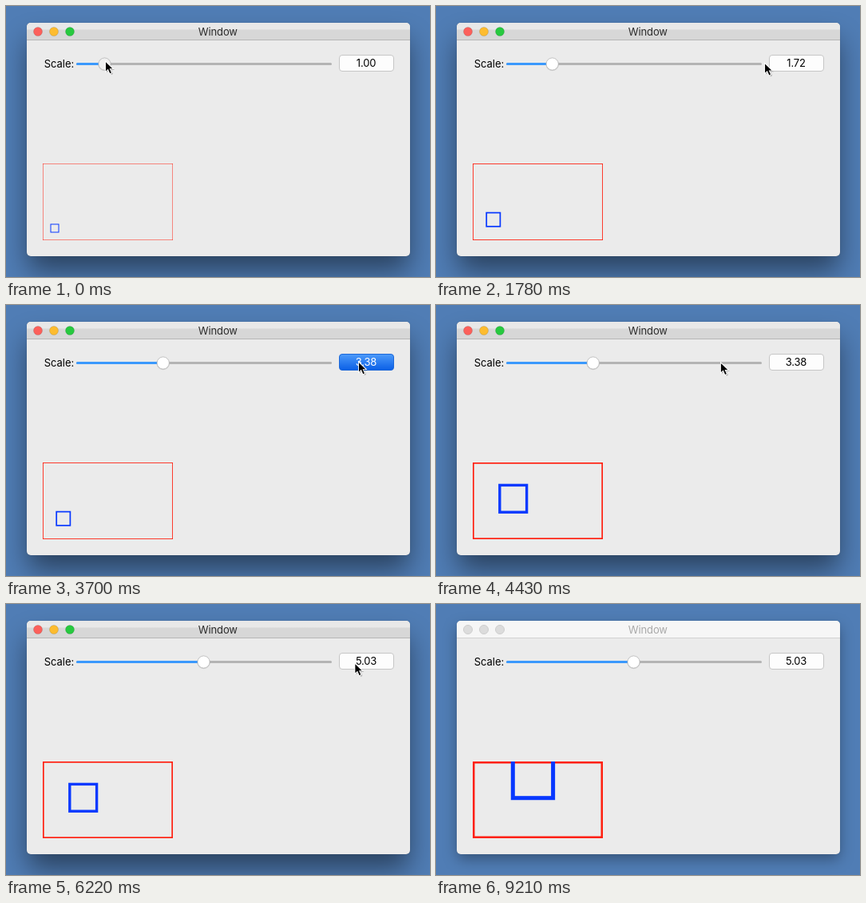
These frames come from a looping animation (531 px wide and 339 px high, 9.31 s). An HTML page:

```html
<!DOCTYPE html>
<html lang="en">
<head>
<meta charset="utf-8">
<title>Window</title>
<style>
html, body { margin: 0; width: 100%; height: 100%; overflow: hidden; background: #507db5; }
#win {
  position: absolute; left: 26px; top: 21px; width: 480px; height: 292px;
  border-radius: 5px; background: #ebebeb;
  box-shadow: 0 20px 34px -2px rgba(0,0,0,.48), 0 0 1px rgba(0,0,0,.35);
}
#win.idle { box-shadow: 0 7px 18px -1px rgba(0,0,0,.34), 0 0 1px rgba(0,0,0,.25); }
#bar {
  box-sizing: border-box; height: 22px; border-radius: 5px 5px 0 0;
  border-bottom: 1px solid #b6b6b6;
  background: linear-gradient(#e8e8e8 8px, #d7d7d7 9px);
}
.idle #bar { background: #f6f6f6; border-color: #d2d2d2; }
svg { position: absolute; left: 0; top: 0; }
text { font: 13px Inter, "Open Sans", sans-serif; text-anchor: middle; }
#title { fill: #2c2c2c; letter-spacing: -.1px; }
.light { stroke: rgba(0,0,0,.12); }
.idle + svg #title { fill: #a9a9a9; }
.idle + svg .light { fill: #dcdcdc; stroke: #cecece; }
</style>
</head>
<body>
<div id="win"><div id="bar"></div></div>
<svg width="531" height="339">
  <defs>
    <linearGradient id="blue" x2="0" y2="1">
      <stop stop-color="#4d9bfa"/><stop offset="1" stop-color="#0a5fe6"/>
    </linearGradient>
    <clipPath id="view"><rect x="46" y="197" width="163" height="96"/></clipPath>
  </defs>
  <circle class="light" cx="40" cy="32" r="5.5" fill="#fc605b"/>
  <circle class="light" cx="60" cy="32" r="5.5" fill="#fdbc2f"/>
  <circle class="light" cx="80" cy="32" r="5.5" fill="#27c93f"/>
  <text id="title" x="265.3" y="37">Window</text>
  <text x="66.5" y="77">Scale:</text>

  <rect x="88" y="71" width="320" height="3" rx="1.5" fill="#b4b4b4"/>
  <rect id="fill" x="88" y="71" height="3" rx="1.5" fill="#3b99fc"/>
  <circle class="thumb" cy="73" r="8.2" opacity=".13"/>
  <circle class="thumb" id="knob" cy="72.5" r="7.6" stroke="#bdbdbd" stroke-width=".8"/>

  <rect id="button" x="417.5" y="61.5" width="68" height="20" rx="3.5"/>
  <text id="value" x="451" y="76" letter-spacing="-.2"></text>

  <g clip-path="url(#view)" fill="none">
    <rect x="46" y="197" width="163" height="96" stroke="#ff2010" id="frame"/>
    <rect id="box" stroke="#0838ff"/>
  </g>

  <g id="cursor">
    <path d="M2 4V15L5 13L8 18L10 17L8 12H12Z" opacity=".25"/>
    <path d="M1 2.2V13.4L3.9 10.7L6.2 16.2L7.9 15.4L5.6 10.2H9.3Z" fill="#000" stroke="#fff" stroke-width="1.8" paint-order="stroke"/>
  </g>
</svg>
<script>
const LOOP = 9310, STEP = 148, IDLE = 9210, ROUND = 16, HOLD = 2, HIDE = 48;
const BUTTON = { x: 441, y: 70 };

// Each round: drag the slider, go to the button, press it, come back.
// drag and press are in steps; grab is the cursor's offset from the knob.
const rounds = [
  { from: 1, to: 1.72, drag: 4, press: 9, grab: 0.5, y: 68, bow: -5 },
  { from: 1.72, to: 3.38, drag: 5.19, press: 9, grab: 7.5, y: 72, bow: -5 },
  { from: 3.38, to: 5.03, drag: 5.97, press: 11, grab: 2.5, y: 72, bow: 5 }
];

const $ = id => document.getElementById(id);
const set = (el, attrs) => { for (const k in attrs) el.setAttribute(k, attrs[k]); };
const clamp = p => Math.min(1, Math.max(0, p));
const mix = (a, b, p) => a + (b - a) * p;
const smooth = p => p * p * (3 - 2 * p);
const easeOut = p => 1 - (1 - p) ** 2.3;
const knobAt = value => 92.7 + 30.78 * value;

function poseAt(n) {
  const i = Math.min(rounds.length - 1, Math.floor(n / ROUND));
  const r = rounds[i], next = rounds[i + 1], k = n - i * ROUND;
  const release = r.press + HOLD;
  const value = mix(r.from, r.to, smooth(clamp(k / r.drag)));

  const go = clamp((k - r.drag) / (r.press - r.drag));
  let x = mix(knobAt(value) + r.grab, BUTTON.x, easeOut(go));
  let y = mix(r.y, BUTTON.y, easeOut(go)) + r.bow * Math.sin(Math.PI * go);
  if (next) {
    const back = smooth(clamp((k - release) / (ROUND - release)));
    x = mix(x, knobAt(value) + next.grab, back);
    y = mix(y, next.y, back);
  }
  return {
    value, x, y,
    dragging: k <= r.drag && (k > 0 || i === 0),
    pressed: k >= r.press && k < release,
    scale: k < release ? r.from : r.to
  };
}

// The scene behind the button keeps the scale of the last press.
function drawScene(s) {
  $('frame').setAttribute('stroke-width', s);
  set($('box'), { x: 46 + 10 * s, y: 293 - 20 * s, width: 10 * s, height: 10 * s, 'stroke-width': s });
}

function draw(now) {
  const t = now % LOOP, n = Math.floor((t + 8) / STEP);
  const { value, x, y, dragging, pressed, scale } = poseAt(n);
  const knobX = knobAt(value);

  document.querySelectorAll('.thumb').forEach(c => c.setAttribute('cx', knobX));
  $('knob').setAttribute('fill', dragging ? '#f0f0f0' : '#fff');
  $('fill').setAttribute('width', knobX - 88);
  set($('button'), pressed ? { fill: 'url(#blue)', stroke: '#1d68d8' } : { fill: '#fdfdfd', stroke: '#c6c6c6' });
  $('value').textContent = value.toFixed(2);
  $('value').setAttribute('fill', pressed ? '#fff' : '#000');
  drawScene(rounds.reduce((s, r, i) => n >= i * ROUND ? scale : s, scale));
  set($('cursor'), { transform: `translate(${x} ${y})`, visibility: n < HIDE ? 'visible' : 'hidden' });
  $('win').className = t >= IDLE ? 'idle' : '';
}

const start = performance.now();
function tick() {
  draw(performance.now() - start);
  requestAnimationFrame(tick);
}
tick();
</script>
</body>
</html>
```
